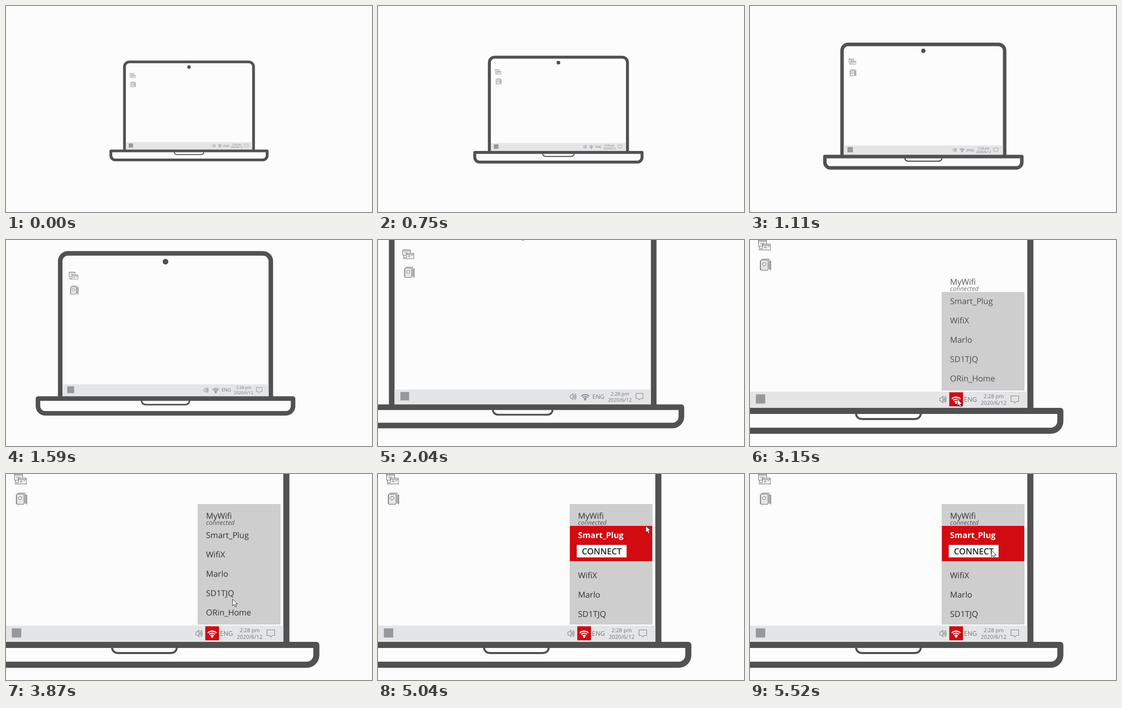
These frames come from a looping animation (720 px wide and 405 px high, 7200 ms). An HTML page:

```html
<!DOCTYPE html>
<html lang="en">
<head>
<meta charset="utf-8">
<title>Connecting to Wi-Fi</title>
<style>
  html, body { margin: 0; width: 100%; height: 100%; overflow: hidden; background: #fcfcfc; }
  svg { display: block; width: 100%; height: 100%; }
  text { font-family: "Open Sans", "Noto Sans", sans-serif; text-rendering: geometricPrecision; }
  .line { fill: none; stroke: #515152; stroke-width: 12; stroke-linejoin: round; }
  .app { fill: none; stroke: #66676a; stroke-width: 1; }
  .tray { fill: none; stroke: #858688; stroke-width: 1.1; }
  .label { fill: #75767a; text-anchor: middle; }
  .item { fill: #333; font-size: 16px; }
</style>
</head>
<body>
<svg viewBox="0 0 720 405">
  <defs>
    <clipPath id="listClip"><rect x="377" y="59" width="163" height="236"/></clipPath>
  </defs>
  <rect width="720" height="405" fill="#fcfcfc"/>

  <g id="laptop">
    <path class="line" style="fill:#fcfcfc" d="M-7 336V-28a21 21 0 0 1 21-21H530.500a21 21 0 0 1 21 21V336"/>
    <circle cx="272.200" cy="-26.900" r="7.500" fill="#515152"/>

    <g class="app">
      <path d="M24 12H16.500V.5H32.500V7.500M16.500 3H32.500M24.500 17V8H40V18.500M24.500 10.500H40M17 19.500H41M18.500 12V17H24.500"/>
      <path d="M21 5.500l-1.500 1.500 1.500 1.500M24 5l-1 4M26 5.500l1.500 1.500-1.500 1.500M28 13h4m2 0h4M27 15.500h6"/>
    </g>
    <g class="app">
      <path d="M22 39.500l2-2H37.500V58"/>
      <rect x="20.500" y="39.500" width="15" height="20" rx="1.500" fill="#e4e5e7"/>
      <circle cx="28" cy="47.500" r="3.200" fill="#fcfcfc"/>
      <path d="M20.500 42v16" stroke-width="2.500" stroke-dasharray="1 1.500"/>
      <path d="M39.500 41V57l.8 2.500.7-2.500V41z"/>
    </g>

    <rect x="-1" y="298" width="546.500" height="32" fill="#e4e5e7"/>
    <rect x="11.500" y="303.500" width="18.500" height="18" fill="#97989a"/>
    <path class="tray" d="M373.500 310.500h2.500l3.500-3.500v13l-3.500-3.500h-2.500zM381 310.500q1.700 3 0 6M382.500 308.500q2.800 5 0 10M384 306.500q4 7 0 14"/>
    <rect id="wifiBox" x="392" y="299.500" width="27" height="27.500" fill="#d20a11"/>
    <g id="wifi" fill="none">
      <path d="M397 312.500a12 12 0 0 1 17 0M399.800 315.300a8 8 0 0 1 11.400 0M402.600 318.100a4 4 0 0 1 5.800 0"/>
      <circle cx="405.500" cy="320" r=".9"/>
    </g>
    <text class="label" x="433.500" y="318" font-size="12.500">ENG</text>
    <text class="label" x="479.300" y="311" font-size="10.500">2:28 pm</text>
    <text class="label" x="479.300" y="324" font-size="10.700">2020/6/12</text>
    <path class="tray" d="M513.500 306.500h15v11h-5l-2.500 3-2.500-3h-5z"/>

    <path class="line" style="fill:#fcfcfc" d="M-66 336H610.500V356a19 19 0 0 1-19 19H-47a19 19 0 0 1-19-19z"/>
    <path class="line" style="stroke-width:4" d="M208.500 340c0 8 5 12 13 12H323c8 0 13-4 13-12"/>
  </g>

  <rect id="panel" x="377" width="163" fill="#cecece"/>
  <g id="list" clip-path="url(#listClip)">
    <text class="item" x="393.500" y="87.500">MyWifi</text>
    <text x="393.500" y="100" font-size="12.500" font-style="italic" fill="#555">connected</text>
    <text class="item" id="plug" x="393.500" y="125.500">Smart_Plug</text>
    <g id="rest">
      <text class="item" x="393.500" y="163.500">WifiX</text>
      <text class="item" x="393.500" y="201.500">Marlo</text>
      <text class="item" x="393.500" y="239.500">SD1TJQ</text>
      <text class="item" x="393.500" y="277.500">ORin_Home</text>
    </g>
    <g id="chosen">
      <rect id="band" x="377.500" y="102" width="162" fill="#d20a11"/>
      <text x="393.500" y="125.500" font-size="16" font-weight="700" fill="#fff">Smart_Plug</text>
      <g id="button">
        <rect x="391" y="139.500" width="98" height="24.500" fill="#fcfcfc"/>
        <text x="401" y="157.500" font-size="16.600" font-weight="600" fill="#222">CONNECT</text>
      </g>
    </g>
  </g>
  <path id="cursor" d="M0 0V13l3-2.800 2.200 5 2.300-1-2.200-4.900h4.200z" fill="#fff" stroke="#333" stroke-linejoin="round"/>
</svg>

<script>
const LOOP = 7200;
const FULL = 2.2;                 // zoom at which the laptop is drawn
const PIVOT = [433.2, 242.3];
const ZOOM = [[455, 1], [1110, 1.26], [1590, 1.632], [2040, 2.03], [2580, FULL]];
const HOME = [408, 313], ROW = [527, 102], BUTTON = [475, 150];

const $ = id => document.getElementById(id);
const set = (id, attrs) => {
  for (const name in attrs) $(id).setAttribute(name, attrs[name]);
};
const part = (t, from, to) => Math.min(1, Math.max(0, (t - from) / (to - from)));
const smooth = u => u * u * (3 - 2 * u);
const sharp = u => u < .5 ? 8 * u ** 4 : 1 - 8 * (1 - u) ** 4;
const mix = (a, b, p) => a + (b - a) * p;

// Smooth curve through keys, at rest at both ends
function follow(keys, t) {
  const last = keys.length - 1;
  if (t <= keys[0][0]) return keys[0][1];
  if (t >= keys[last][0]) return keys[last][1];
  const i = keys.findIndex(k => k[0] > t) - 1;
  const slope = j => j < 1 || j >= last ? 0 :
    (keys[j + 1][1] - keys[j - 1][1]) / (keys[j + 1][0] - keys[j - 1][0]);
  const [t0, a] = keys[i], [t1, b] = keys[i + 1];
  const d = t1 - t0, u = (t - t0) / d;
  return mix(a, b, smooth(u)) +
    d * u * (1 - u) * ((1 - u) * slope(i) - u * slope(i + 1));
}

function draw(t) {
  const k = follow(ZOOM, t) / FULL;
  const [px, py] = PIVOT;
  set("laptop", { transform: `translate(${px} ${py}) scale(${k}) translate(${-px} ${-py})` });

  const active = t >= 2610;
  set("wifiBox", { opacity: +active });
  set("wifi", { stroke: active ? "#fff" : "#75767a", "stroke-width": active ? 2.3 : 1.7 });

  const rise = smooth(part(t, 2670, 3330));
  const height = 237 * rise;
  set("panel", { y: 296 - height, height });
  set("list", { opacity: rise });

  const open = smooth(part(t, 4020, 4200));
  set("chosen", { opacity: open });
  set("band", { height: mix(38, 69.5, open) });
  set("plug", { opacity: 1 - open });
  set("rest", { transform: `translate(0 ${41.5 * open})` });

  const up = sharp(part(t, 3580, 4230));
  const down = smooth(part(t, 5025, 5520));
  const [x, y] = [0, 1].map(i => mix(mix(HOME[i], ROW[i], up), BUTTON[i], down));
  set("cursor", { transform: `translate(${x} ${y})`, opacity: +active });
}

let start;
function tick(now) {
  start ??= now;
  draw((now - start) % LOOP);
  requestAnimationFrame(tick);
}
draw(0);
requestAnimationFrame(tick);
</script>
</body>
</html>
```
